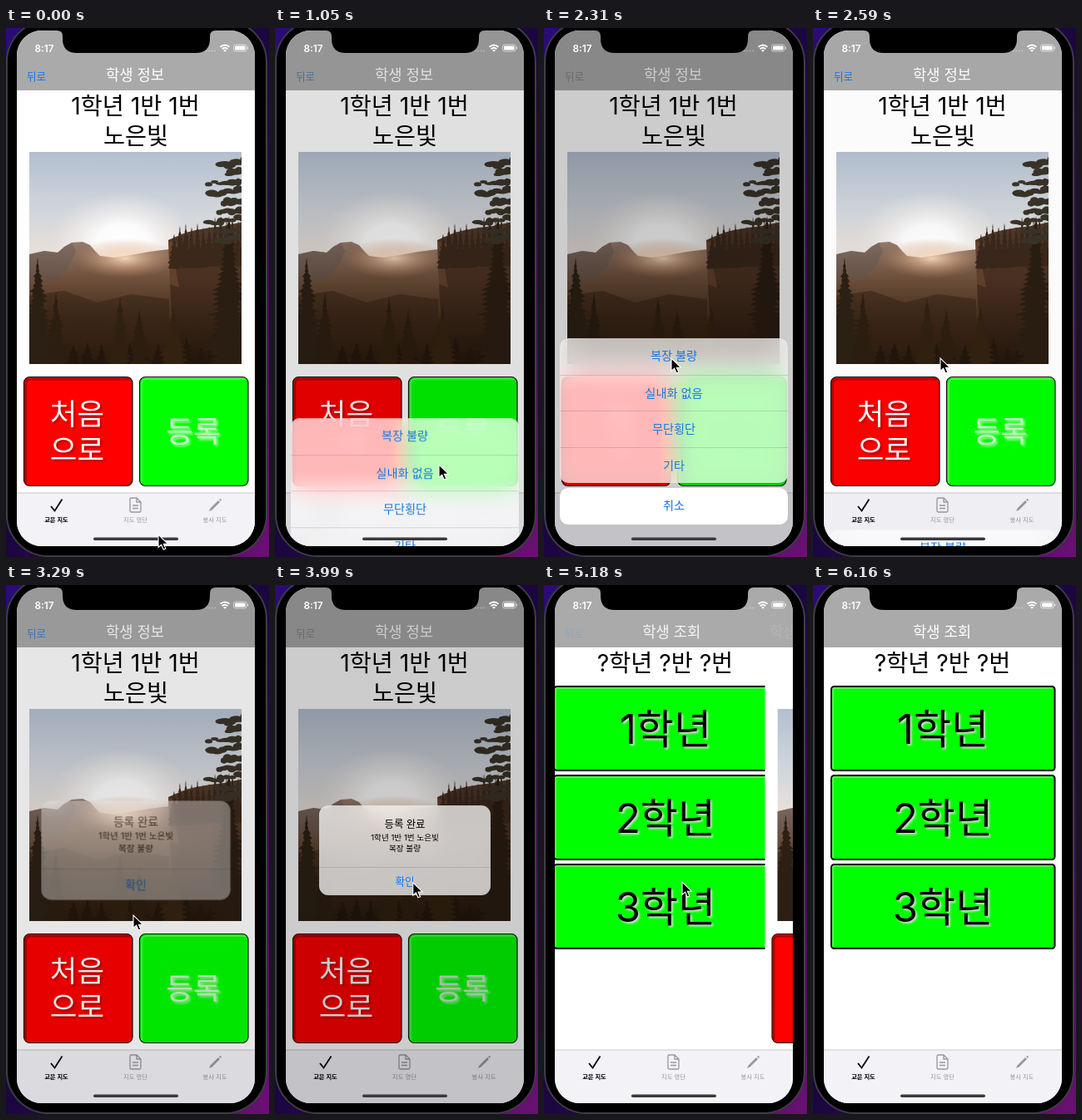
An HTML page that plays this animation: 316 px wide and 636 px high, repeating every 6230 ms.

```html
<!DOCTYPE html>
<html lang="ko">
<head>
<meta charset="utf-8">
<style>
html, body { margin: 0; width: 100%; height: 100%; overflow: hidden; background: #22064f; }
#stage { position: absolute; left: 0; top: 0; width: 316px; height: 636px; overflow: hidden;
  font-family: Inter, "Noto Sans CJK KR", "Noto Sans CJK", sans-serif; }
svg { position: absolute; left: 0; top: 0; }
text { text-anchor: middle; }
#screen { position: absolute; left: 13px; top: 3px; width: 286px; height: 620px; border-radius: 30px;
  overflow: hidden; background: #fff; }
#view { position: absolute; left: -13px; top: -3px; width: 316px; height: 636px; }
#dim { position: absolute; inset: 0; background: #000; }
.h1 { font-size: 28.3px; }
.grade { font-size: 49px; filter: drop-shadow(2px 2px 1px #cfdccf); }
.big { font-size: 35.5px; font-weight: 300; fill: #fff; }
.nav { font-size: 17.7px; fill: #fff; }
.tab { font-size: 7.3px; fill: #999; }
#sheet, #cancel { position: absolute; left: 19px; width: 274px; border-radius: 10px; overflow: hidden;
  text-align: center; font-size: 14.2px; line-height: 42px; color: #1676dc; }
#sheet { top: 373px; height: 174px; background: #ffffffb8; backdrop-filter: blur(15px) saturate(1.8); }
#sheet div { height: 43.5px; box-sizing: border-box; }
#sheet div + div { border-top: 1px solid #0002; }
#cancel { top: 553px; height: 44px; background: #fff; font-weight: 500; }
#alert { position: absolute; left: 53px; top: 265px; width: 206px; height: 108px; border-radius: 11px;
  overflow: hidden; text-align: center; background: #f4f4f4c8; backdrop-filter: blur(8px); }
#alert div { position: absolute; width: 100%; }
#alert .title { top: 13px; font-size: 12.4px; line-height: 20px; font-weight: 500; }
#alert .msg { top: 32px; font-size: 9.6px; line-height: 13px; }
#ok { top: 74px; height: 34px; line-height: 34px; font-size: 12.6px; color: #0a7aff; border-top: 1px solid #0002; }
</style>
</head>
<body>
<div id="stage">
  <svg width="316" height="636">
    <defs>
      <linearGradient id="wall" x1="0" y1="0" x2="1" y2="1">
        <stop offset="0" stop-color="#2c0b78"/><stop offset=".5" stop-color="#1b063f"/><stop offset="1" stop-color="#6a1173"/>
      </linearGradient>
    </defs>
    <rect width="316" height="636" fill="url(#wall)"/>
    <rect x="1" y="-9" width="312" height="644" rx="50" fill="#000" stroke="#3e3d44" stroke-width="2"/>
  </svg>

  <div id="screen"><div id="view">
    <svg id="list" width="316" height="636">
      <text class="h1" x="155.5" y="104">?학년 ?반 ?번</text>
      <g id="grades"></g>
    </svg>

    <svg id="info" width="316" height="636">
      <defs>
        <linearGradient id="sky" x1="0" y1="0" x2="0" y2="1">
          <stop offset="0" stop-color="#b3bfcf"/><stop offset=".25" stop-color="#ced4db"/><stop offset=".46" stop-color="#e6dfda"/>
        </linearGradient>
        <linearGradient id="hills" x1="0" y1="0" x2="0" y2="1">
          <stop offset="0" stop-color="#957b6c"/><stop offset=".3" stop-color="#6d4f3a"/>
          <stop offset=".6" stop-color="#442d1b"/><stop offset="1" stop-color="#20140a"/>
        </linearGradient>
        <linearGradient id="cliff" x1="0" y1="0" x2="0" y2="1">
          <stop offset="0" stop-color="#50382a"/><stop offset=".4" stop-color="#4a3020"/><stop offset="1" stop-color="#20140a"/>
        </linearGradient>
        <radialGradient id="sun">
          <stop offset="0" stop-color="#fff"/><stop offset=".35" stop-color="#fff" stop-opacity=".9"/>
          <stop offset="1" stop-color="#f4ebe6" stop-opacity="0"/>
        </radialGradient>
        <radialGradient id="haze">
          <stop offset="0" stop-color="#ffe0c4" stop-opacity=".9"/><stop offset="1" stop-color="#c98a5c" stop-opacity="0"/>
        </radialGradient>
        <clipPath id="frame"><rect x="28" y="149" width="255" height="255"/></clipPath>
      </defs>
      <rect x="13" y="75" width="300" height="490" fill="#fff"/>
      <text class="h1" x="155.5" y="104">1학년 1반 1번</text>
      <text class="h1" x="156" y="140">노은빛</text>
      <g clip-path="url(#frame)">
        <rect x="28" y="149" width="255" height="255" fill="url(#sky)"/>
        <ellipse cx="140" cy="258" rx="88" ry="62" fill="url(#sun)"/>
        <g style="filter:blur(.6px)">
          <path d="M24 273L46 268 62 270 70 263 79 258 92 257 101 261 107 268 113 274 130 276 150 273 172 269 196 266H290V410H24Z" fill="url(#hills)"/>
          <path d="M24 273L46 268 62 270 70 263 79 258 84 268 76 286 62 302 24 306Z" fill="#5d5556" opacity=".4"/>
          <ellipse cx="143" cy="277" rx="62" ry="24" fill="url(#haze)"/>
          <path d="M24 322L70 316 110 330 150 320 196 326V410H24Z" fill="#332112" opacity=".5"/>
          <path d="M195 255L204 251 216 246 228 243 245 240 262 238 290 232V410H206L198 330Z" fill="url(#cliff)"/>
          <path d="M195 256L206 259 203 285 208 312 197 308Z" fill="#7b5138" opacity=".5"/>
          <g id="pines"></g>
        </g>
      </g>
      <g stroke="#111" stroke-width="1.2">
        <rect x="21.5" y="419.5" width="130.500" height="131" rx="7" fill="#f00"/>
        <rect x="160.5" y="419.5" width="130.500" height="131" rx="7" fill="#0f0"/>
      </g>
      <path d="M23.500 547V428Q23.500 422 30 422H149" fill="none" stroke="#7a0000" stroke-width="3" opacity=".55"/>
      <path d="M163 547V428Q163 422 169 422H288" fill="none" stroke="#fff" opacity=".5"/>
      <g class="big" style="filter:drop-shadow(2px 2px 1px #7008)">
        <text x="85.500" y="476.500">처음</text><text x="85.500" y="520">으로</text>
      </g>
      <text class="big" x="225" y="497.5" style="fill:#c8f4c8;filter:drop-shadow(2px 2px 1.5px #fffa)">등록</text>
    </svg>

    <svg width="316" height="636">
      <rect x="13" width="286" height="75" fill="#aaa"/>
      <text id="newTitle" class="nav" x="155" y="62.5">학생 조회</text>
      <text id="oldTitle" class="nav" x="155" y="62.5">학생 정보</text>
      <text id="back" x="36.5" y="63" font-size="12.6">뒤로</text>
      <rect x="13" y="559" width="286" height="70" fill="#f3f2f7"/>
      <path d="M13 559H299" stroke="#c8c8cc"/>
      <path d="M54 575L58.5 580.5 67.5 566.5" fill="none" stroke="#000" stroke-width="1.8"/>
      <path d="M149 566.5Q149 565 150.500 565H157L162 570V580.500Q162 582 160.500 582H150.500Q149 582 149 580.500ZM157 565V570H162M152 574H159M152 577.500H159" fill="none" stroke="#999" stroke-width="1.3"/>
      <path d="M244 581L245.500 577.500 255 568 257 570 247.500 579.500ZM256 567L257.500 565.800 259 567.500 258 569Z" fill="#999"/>
      <text class="tab" x="60.5" y="593.500" style="fill:#000;font-weight:600">교문 지도</text>
      <text class="tab" x="155.500" y="593.500">지도 명단</text>
      <text class="tab" x="251" y="593.500">봉사 지도</text>
    </svg>

    <div id="dim"></div>
    <div id="sheet"><div id="row">복장 불량</div><div>실내화 없음</div><div>무단횡단</div><div>기타</div></div>
    <div id="cancel">취소</div>
    <div id="alert">
      <div class="title">등록 완료</div>
      <div class="msg">1학년 1반 1번 노은빛<br>복장 불량</div>
      <div id="ok">확인</div>
    </div>

    <svg width="316" height="636">
      <text x="46" y="28.500" font-size="11.8" font-weight="600" fill="#fff">8:17</text>
      <path d="M240 27.500H253" stroke="#fff" stroke-width="1.500" stroke-dasharray="1.500 2" opacity=".4"/>
      <path d="M257.500 22.800Q263 18.200 268.500 22.800M259.600 25.200Q263 22.300 266.400 25.200" fill="none" stroke="#fff" stroke-width="1.800"/>
      <path d="M261 26.800Q263 25.200 265 26.800L263 28.800Z" fill="#fff"/>
      <rect x="273.500" y="20" width="15.500" height="8" rx="2.300" fill="none" stroke="#fff" stroke-opacity=".6"/>
      <rect x="275" y="21.500" width="12.500" height="5" rx="1.200" fill="#fff"/>
      <path d="M290.500 22.500V25.500" stroke="#fff" stroke-opacity=".7"/>
      <rect x="105" y="612.500" width="102" height="3.600" rx="1.800" fill="#3a3a3c"/>
    </svg>
  </div></div>

  <svg width="316" height="636">
    <path d="M61 0V3Q68 3 68 10V13Q68 30 85 30H228Q245 30 245 13V10Q245 3 252 3V0Z" fill="#000"/>
    <path id="cursor" d="M0 0V15.500L3.600 12.200 6.200 18 8.800 16.900 6.300 11.200H11.300Z" fill="#000" stroke="#fff" stroke-width="1.100"/>
  </svg>
</div>
<script>
const $ = id => document.getElementById(id);
const clamp = x => Math.min(1, Math.max(0, x));

$('grades').innerHTML = [1, 2, 3].map((n, i) => {
  const y = 122 + 107 * i;
  return `<rect x="22" y="${y}" width="268.500" height="101" rx="3.500" fill="#0f0" stroke="#000" stroke-width="2"/>
    <path d="M24 ${y + 99}V${y + 2}H288" fill="none" stroke="#dfd" opacity=".7"/>
    <text class="grade" x="156" y="${y + 69}">${n}학년</text>`;
}).join('');

let seed = 7;
const rnd = () => (seed = seed * 16807 % 2147483647) / 2147483647;

// A ragged conifer, widening from its tip to its base
function pine(x, top, base, half, color) {
  const left = [], right = [];
  for (let y = top; y < base; y += 6) {
    const w = half * (y - top + 4) / (base - top);
    const a = w * (.7 + .6 * rnd()), b = w * (.7 + .6 * rnd());
    left.push(`${x - a} ${y + 5}`, `${x - a * .6} ${y + 6}`);
    right.unshift(`${x + b * .6} ${y + 6}`, `${x + b} ${y + 5}`);
  }
  return `<path d="M${x} ${top}L${left.join(' ')} ${right.join(' ')}Z" fill="${color}"/>`;
}

let trees = '';
for (let x = 202; x < 284; x += 7) trees += pine(x, 248 - (x - 200) * .2 - rnd() * 12, 285, 8, '#3a281b');
for (let x = 30; x < 284; x += 17) trees += pine(x, 362 + rnd() * 24, 414, 14, '#23160c');
trees += pine(38, 276, 414, 27, '#2c2014') + pine(60, 318, 414, 18, '#2c1e10')
  + pine(137, 324, 414, 19, '#30200f') + pine(160, 338, 414, 17, '#2d1d0f')
  + pine(201, 335, 414, 21, '#33220f') + pine(268, 226, 414, 34, '#2a1d12');
// Overhanging boughs at the right edge, made of loose clumps of needles
[30, 20, 46, 42, 26, 32, 46, 36, 34].forEach((reach, i) => {
  for (let k = 0; k < 7; k++) {
    const x = 286 - reach * k / 6.5, y = 160 + i * 11.5 + k * .8 + (rnd() - .5) * 5;
    trees += `<ellipse cx="${x}" cy="${y}" rx="${4 + rnd() * 4}" ry="${1.8 + rnd() * 3.2}" fill="#3a3328"/>`;
  }
});
$('pines').innerHTML = trees;

// Critically damped spring from 0 to 1
function spring(t, start, rate) {
  const x = Math.max(0, t - start) / 1000 * rate;
  return 1 - (1 + x) * Math.exp(-x);
}

// time, x, y of the pointer's tip
const path = [[0, 183, 609], [560, 207, 463], [630, 207, 463], [770, 197, 525], [1470, 197, 525],
  [2100, 153, 397], [3360, 153, 397], [3850, 165, 360], [4060, 166, 357], [5250, 166, 357],
  [5600, 165, 380], [5880, 148, 642], [6230, 148, 642]];

function pointer(t) {
  const i = path.findIndex(p => p[0] > t);
  const [t0, x0, y0] = path[i - 1], [t1, x1, y1] = path[i];
  const u = (t - t0) / (t1 - t0), k = u * u * (3 - 2 * u);
  return [x0 + (x1 - x0) * k, y0 + (y1 - y0) * k];
}

const move = (el, x, y = 0) => el.style.transform = `translate(${x}px,${y}px)`;
const show = (el, on) => el.style.display = on ? '' : 'none';

function draw(t) {
  const sheet = t < 2800 ? spring(t, 985, 32) - spring(t, 2310, 15) : 0;
  const fadeIn = spring(t, 3225, 25);
  const alert = t < 4900 ? fadeIn - spring(t, 4440, 15) : 0;
  const pop = t < 5600 ? spring(t, 4975, 18) : 1;
  const dim = clamp(Math.max(sheet, alert));

  $('dim').style.opacity = .2 * dim;
  for (const id of ['sheet', 'cancel']) {
    show($(id), sheet > .003);
    move($(id), 0, 250 * (1 - sheet));
  }
  $('row').style.background = t >= 2170 && t < 2310 ? '#0000001c' : '';

  show($('alert'), alert > .003);
  $('alert').style.opacity = clamp(alert);
  $('alert').style.transform = `scale(${1.2 - .2 * fadeIn})`;
  $('ok').style.background = t >= 4340 && t < 4480 ? '#0000001c' : '';

  move($('info'), 286 * pop);
  show($('info'), pop < 1);
  move($('list'), -86 * (1 - pop));
  move($('oldTitle'), 171 * pop);
  $('oldTitle').style.opacity = 1 - pop;
  move($('newTitle'), -119 * (1 - pop) ** 2);
  $('newTitle').style.opacity = pop;
  $('back').style.opacity = 1 - pop;
  $('back').style.fill = `rgb(${[[0, 132], [122, 132], [255, 132]].map(([a, b]) => a + (b - a) * dim)})`;

  const [x, y] = pointer(t);
  $('cursor').setAttribute('transform', `translate(${x} ${y})`);
}

function tick() {
  const t = performance.now() % 6230;
  draw(Math.floor(t / 70) * 70);
  requestAnimationFrame(tick);
}
tick();
</script>
</body>
</html>
```
